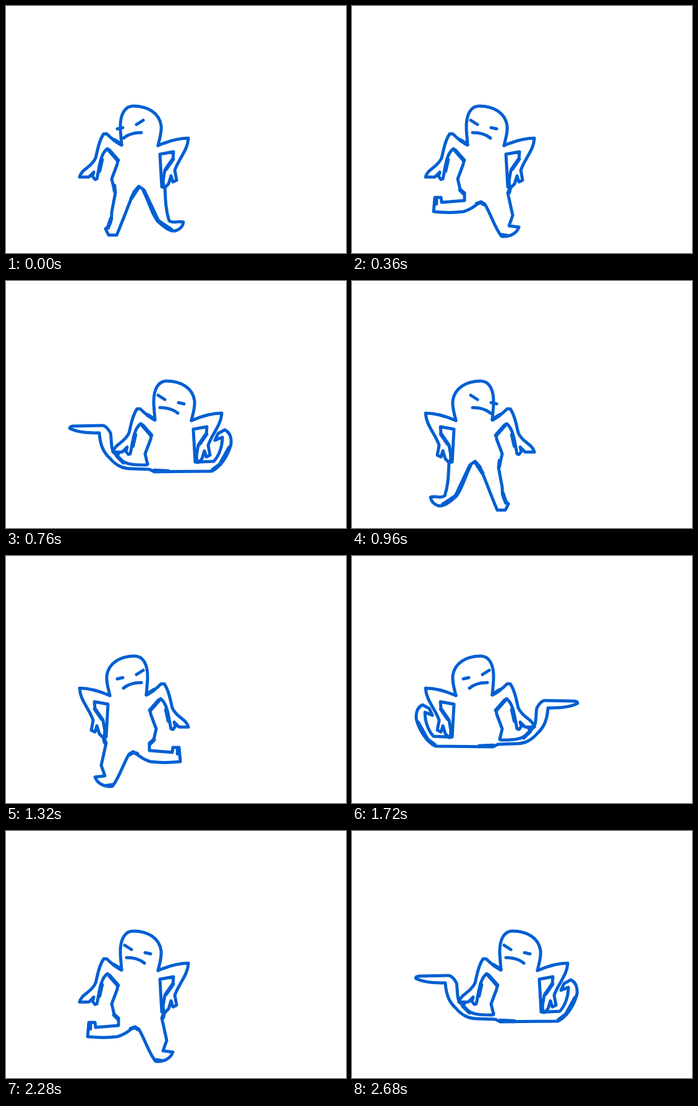
Animation, 550 px wide and 400 px high, one loop 2760 ms. Source, as an HTML page:

```html
<!DOCTYPE html>
<html lang="en">
<head>
<meta charset="utf-8">
<title>Running figure</title>
<style>
html, body { margin: 0; width: 100%; height: 100%; overflow: hidden; background: #fff; }
svg { display: block; }
path { fill: none; stroke: #005fd2; stroke-width: 5; stroke-linejoin: round; stroke-linecap: round; }
.bold { stroke-width: 6.5; }
</style>
</head>
<body>
<svg width="550" height="400" viewBox="0 0 550 400">
  <g id="figure">
    <g id="upper">
      <!-- head -->
      <path d="M187 225L185 200C184 174 193 162 206 162C229 162 248 173 251 194C252 206 248 216 246 226"/>
      <!-- left arm and side -->
      <path d="M187 225C177 220 169 213 163 207L158 207C149 220 148 236 145 246C138 262 122 264 119 277L134 277L142 269L140 276L144 281L147 280C151 262 152 240 164 231L181 249L180 256L171 280L175 297"/>
      <!-- right arm and side -->
      <path d="M246 226C262 219 277 214 295 214C294 234 280 246 273 266L276 282L270 285L267 275L263 288L257 294L252 293L249 240L271 236L270 248L257 266L254 283"/>
      <path class="bold" d="M175 217L186 224M167 234L181 250M151 267L155 249M270 248L259 264M253 280L254 291"/>
    </g>
    <g id="face">
      <path d="M195 205C209 205 217 208 224 214"/>
      <path d="M192 185L203 192M225 197L234 199"/>
    </g>
    <path id="legs"/>
    <path id="accents" class="bold"/>
  </g>
</svg>
<script>
// axis: sum of a point's x and its mirrored x
const poses = [
  { axis: 414,
    legs: "M175 297L177 302L171 334C171 353 167 356 161 361L166 371L179 371C188 350 197 325 207 301L215 292L222 297C231 318 238 342 248 351C258 360 267 366 274 364C281 362 286 357 287 350C278 347 272 353 264 348C258 330 258 313 257 293",
    accents: "M170 344L165 359M203 311L214 294M223 299L246 348L267 362M175 291L176 300" },
  { axis: 414,
    legs: "M175 297L179 304L172 332L157 337L151 332L143 340L152 355L181 348C192 339 199 326 208 308L216 308C226 331 232 350 246 367C258 376 275 369 279 359L261 354C258 335 255 315 256 293",
    accents: "M201 321L209 309M245 365L256 371M175 291L178 302" },
  { axis: 414,
    legs: "M175 297L182 303L182 315L145 318L144 310L134 310L132 333C150 335 165 335 180 333C193 330 199 323 208 317L215 321C226 340 231 360 242 373C255 374 266 369 270 358L254 356L260 339L252 303L256 293",
    accents: "M202 320L209 318L213 321M136 312L136 320M242 371L250 372M175 298L181 304M254 302L256 293" },
  { axis: 383,
    legs: "M175 297L178 303L150 304C136 303 126 299 117 291L91 288L89 299L113 310C143 329 178 328 207 317C225 326 231 344 241 355L271 355C277 347 269 343 258 342C262 325 257 309 256 293",
    accents: "M199 320L209 317M92 290L91 298M241 354L252 354" },
  { axis: 468, shift: 54,
    legs: "M229 295L227 298C205 298 193 297 184 288L173 276L182 280M173 276C169 264 171 255 169 246C165 239 160 234 156 234L108 235C102 236 102 239 106 240C121 246 136 246 151 246C152 263 156 276 168 287C179 300 190 304 204 304L232 305L240 309L333 308C347 301 359 283 364 264C365 252 362 245 354 241L343 247L338 258L350 253C350 269 344 284 336 292L314 293",
    accents: "M180 284L190 294M334 306L346 297L361 270M240 307L262 308" }
];

const $ = id => document.getElementById(id);

function draw(now) {
  const t = now % 2760, step = t % 960;
  const index = step < 160 ? 0 : 1 + Math.floor((step - 160) / 200);
  const { axis, shift = 0, legs, accents } = poses[index];
  const flipped = Math.floor(t / 960) % 2;

  $("figure").setAttribute("transform", flipped ? `matrix(-1 0 0 1 ${axis} 0)` : "");
  $("upper").setAttribute("transform", `translate(${shift})`);
  // the first pose still looks the other way
  $("face").setAttribute("transform", index ? `translate(${shift})` : "matrix(-1 0 0 1 414 0)");
  $("legs").setAttribute("d", legs);
  $("accents").setAttribute("d", accents);
  requestAnimationFrame(draw);
}
draw(performance.now());
</script>
</body>
</html>
```
